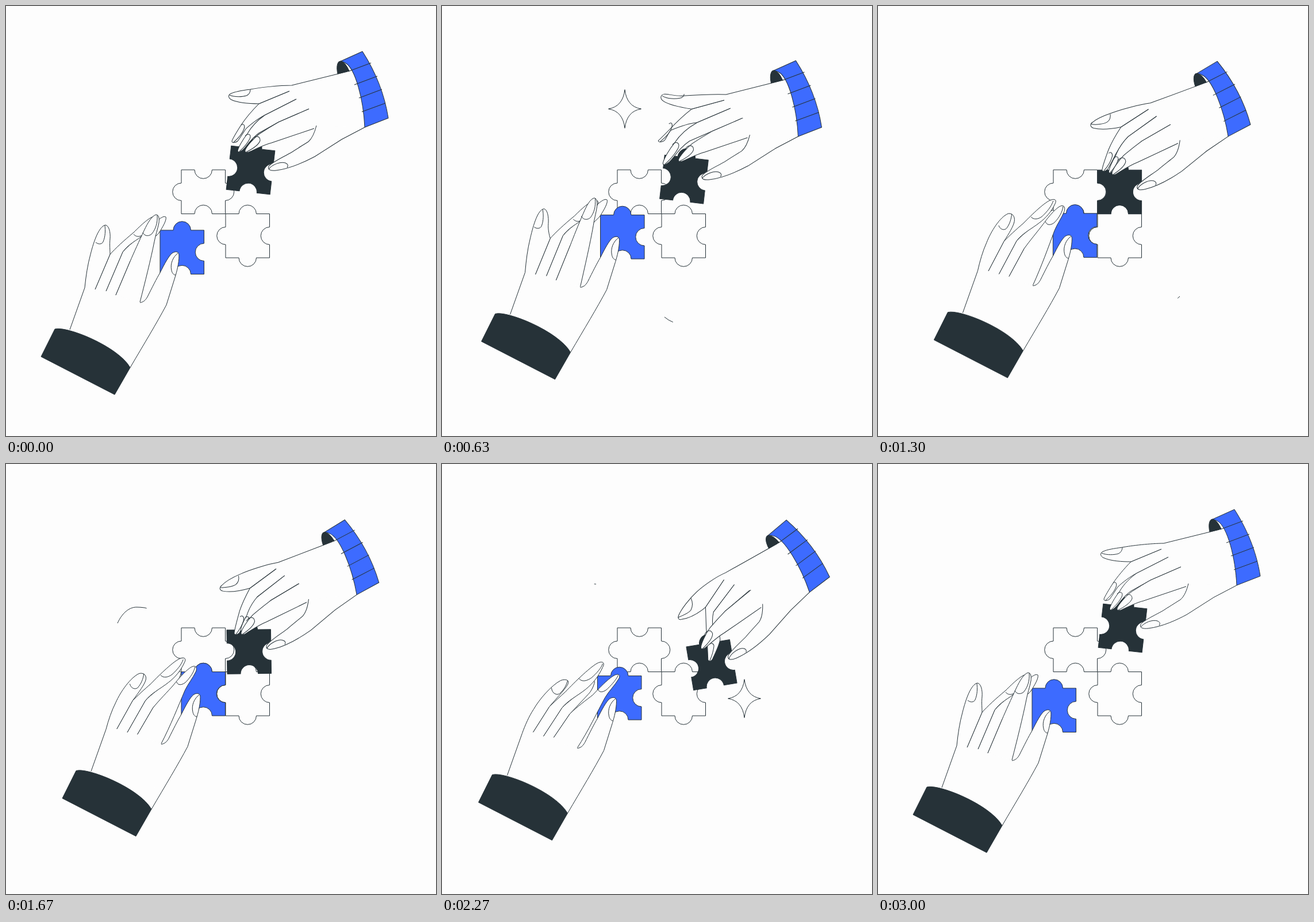
Write an HTML page that moves like this. It is 748x748 px and loops after 3.03 s.

```html
<!DOCTYPE html>
<html lang="en">
<head>
<meta charset="utf-8">
<title>Puzzle hands</title>
<style>
  html, body { margin: 0; width: 100%; height: 100%; overflow: hidden; background: #fdfdfd; }
  svg { display: block; width: 100vw; height: 100vh; }
  path { fill: none; stroke: #263238; stroke-width: 1; stroke-linejoin: round; }
  .skin { fill: #fdfdfd; }
  .palm { fill: #fdfdfd; stroke: none; }
  .blue { fill: #3d6bff; }
  .dark { fill: #263238; }
</style>
</head>
<body>
<svg id="stage" viewBox="0 0 748 748"></svg>
<script>
const LOOP = 3030;
const stage = document.getElementById('stage');

function add(parent, tag, attrs = {}) {
  const el = document.createElementNS('http://www.w3.org/2000/svg', tag);
  for (const k in attrs) el.setAttribute(k, attrs[k]);
  return parent.appendChild(el);
}
const draw = (parent, d, cls = '') => add(parent, 'path', { d, class: cls });

// Sides run clockwise from the top: 1 tab, -1 notch, 0 flat
function piece(x, y, sides) {
  let d = `M${x} ${y}`;
  [[1, 0], [0, 1], [-1, 0], [0, -1]].forEach(([u, v], i) => {
    const line = n => `l${u * n} ${v * n}`;
    const s = sides[i];
    d += s
      ? `${line(23)}a15.25 15.25 0 0 ${s > 0 ? 1 : 0} ${u * 30.5} ${v * 30.5}${line(23)}`
      : line(76.5);
  });
  return d + 'Z';
}

// A path that blends between two poses
const morphs = { left: [], right: [] };
function bend(side, parent, cls, a, b) {
  const to = b.match(/[\d.]+/g).map(Number);
  const el = draw(parent, a, cls);
  morphs[side].push(k => {
    let i = 0;
    el.setAttribute('d', a.replace(/[\d.]+/g, n => (+n + (to[i++] - n) * k).toFixed(2)));
  });
}

// Smooth curve through rows of [time, ...values], without overshoot
function track(rows) {
  const slope = (i, c) => {
    if (i === 0 || i === rows.length - 1) return 0;
    const d = j => (rows[j + 1][c] - rows[j][c]) / (rows[j + 1][0] - rows[j][0]);
    const p = d(i - 1), n = d(i);
    return p * n <= 0 ? 0 : 2 * p * n / (p + n);
  };
  return t => {
    let i = 0;
    while (i < rows.length - 2 && t >= rows[i + 1][0]) i++;
    const a = rows[i], b = rows[i + 1], h = b[0] - a[0];
    const u = Math.min(1, Math.max(0, (t - a[0]) / h));
    return a.slice(1).map((v, j) => {
      const c = j + 1, w = 1 - u;
      return v * (1 + 2 * u) * w * w + h * slope(i, c) * u * w * w
        + b[c] * u * u * (3 - 2 * u) - h * slope(i + 1, c) * u * u * w;
    });
  };
}

// Fixed pieces
draw(stage, piece(305, 285, [-1, 1, -1, 1]));
draw(stage, piece(382, 361.5, [1, -1, 1, 1]));

// Sparkles
const sparkle = 'M0-33.5Q3.5-4 28.5 0Q3.5 4 0 33.5Q-3.5 4-28.5 0Q-3.5-4 0-33.5Z';
const stars = [[318, 179, 650], [526, 408, 2240]].map(([x, y, peak]) => {
  const el = draw(stage, sparkle);
  el.setAttribute('vector-effect', 'non-scaling-stroke');
  return t => {
    const a = (t - peak) / 570;
    const k = Math.abs(a) < 1 ? Math.cos(a * Math.PI / 2) : 0;
    el.setAttribute('transform', `translate(${x} ${y}) scale(${k})`);
    el.style.display = k > 0.02 ? '' : 'none';
  };
});

// Curls: a stretch of line running along a path, rows are [time, tail, head]
const curls = [
  ['M387 541Q394 547 402 550C430 560 457 545 463 518C470 490 462 482 448 482' +
   'C432 482 428 497 432 507Q435 515 440 518C460 532 500 530 525 505',
   L => [[560, 0, 0], [630, 0, 17], [970, 92, 188], [1200, 220, L], [1330, L, L]]],
  ['M194 277C200 263 212 249 227 249Q234 249 241 250C258 253 262 280 246 280' +
   'C230 280 232 240 244 222Q253 207 268 209',
   L => [[1540, 0, 0], [1670, 0, 63], [2150, L - 45, L], [2270, L - 4, L], [2290, L, L]]]
].map(([d, rows]) => {
  const el = draw(stage, d);
  const at = track(rows(el.getTotalLength()));
  return t => {
    const [tail, head] = at(t);
    el.style.display = head - tail > 0.3 ? '' : 'none';
    el.setAttribute('stroke-dasharray', `0 ${tail} ${head - tail} 2000`);
  };
});

// Left hand
const left = add(stage, 'g');
draw(left, piece(268, 390, [1, -1, -1, 0]), 'blue');
draw(left, 'M111 563L137 490L155 493L174 496L191 503L233 516L279 520L216 629Z', 'palm');
bend('left', left, 'skin',
  'M174 496L203 428C215 413 240 398 255 382C265 371 274 364 278 367C280 372 272 386 265 396L216 444L191 503',
  'M174 495L206 446C215 436 235 422 250 409C256 402 262 397 263 400C262 408 256 418 252 422L220 456L192 497');
bend('left', left, 'skin',
  'M155 493L181 432C190 422 205 408 222 394C236 380 250 367 258 366C264 364 268 366 264 373C260 381 250 392 240 398C228 407 212 415 203 428L174 496',
  'M156 488L184 444C192 436 203 426 212 418C228 401 259 371 270 367C278 364 281 368 277 375C270 391 260 403 248 413C233 425 216 433 206 446L174 495');
bend('left', left, '',
  'M222 397C226 402 233 402 238 398C246 390 254 380 258 367',
  'M236 395C241 401 250 399 258 393C267 385 274 377 277 369');
bend('left', left, 'skin',
  'M111 563L137 490C139 470 142 450 147 432C153 408 162 383 173 381C179 382 182 393 181 405C180 415 181 425 181 432L155 493',
  'M111 563L137 490C142 476 149 460 157 448C166 432 187 407 204 398C212 395 219 397 217 403C215 410 200 425 184 444L156 488');
bend('left', left, '',
  'M156 411C160 415 167 415 169 410C173 401 173 390 172 382',
  'M188 411C189 421 197 424 202 421C209 415 214 407 216 398');
bend('left', left, 'skin',
  'M191 503L216 444C222 430 232 408 240 391C247 376 254 365 261 363C266 363 267 370 266 377C264 388 260 399 258 410C252 440 242 480 233 515',
  'M192 497L220 456C232 444 250 431 260 423C273 409 292 390 300 388C306 386 308 390 305 395C298 407 288 416 281 428C268 452 252 486 233 515');
bend('left', left, '',
  'M238 394C241 401 249 401 254 396C260 388 264 378 263 364',
  'M269 413C270 420 279 419 286 412C294 404 301 396 304 389');
draw(left, 'M233 516C240 515 243 511 246 506C254 490 262 474 268 464C276 448 283 435 289 430' +
  'C295 426 301 427 301 434C301 448 297 462 294 472L279 520C262 552 240 588 216 629', 'skin');
draw(left, 'M299 430C291 436 285 448 288 460C289 465 292 468 295 468');
draw(left, 'M85 562C105 556 195 592 216 629L189 676L61 610Z', 'dark');

// Right hand
const PIVOT = [425.5, 285.5];
const right = add(stage, 'g');
draw(right, piece(PIVOT[0] - 38.25, PIVOT[1] - 38.25, [1, -1, -1, -1]), 'dark')
  .setAttribute('transform', `rotate(6.5 ${PIVOT})`);
draw(right, 'M594 114L497 138L493 148L505 162L527 179L536 213L526 236L537 262L584 232L624 211C622 165 608 115 594 110Z', 'palm');
bend('right', right, 'skin',
  'M493 148L440 170C428 182 415 198 409 207C402 218 394 231 393 235C393 239 399 238 403 235C408 228 413 220 417 214C425 206 440 195 450 190L505 162',
  'M487 149L443 186C440 198 437 210 434 222C431 238 425 262 422 275C422 280 427 279 430 276C436 269 448 256 452 247C455 230 454 212 454 198L502 162');
bend('right', right, '',
  'M409 207C414 203 416 209 414 214C411 222 404 230 396 237',
  'M432 250C436 247 440 252 438 256C435 263 430 271 424 278');
bend('right', right, 'skin',
  'M505 162L450 190C440 197 428 208 420 222C412 232 404 246 403 252C404 257 412 251 416 246C424 236 430 228 440 221L474 202L527 179',
  'M502 162L454 198C450 205 447 215 446 222C442 228 438 234 437 238C438 241 441 238 443 236C446 232 449 229 452 226L474 202L525 179');
bend('right', right, '',
  'M416 226C422 220 427 224 424 231C420 239 413 247 406 253',
  'M442 228C444 226 446 227 445 230C444 233 442 236 439 238');
draw(right, 'M527 179L474 202C460 210 446 219 440 223C430 231 418 245 416 251C415 256 421 255 425 253C438 247 450 241 462 238L536 213', 'skin');
draw(right, 'M428 232C434 224 442 226 442 234C440 241 428 249 418 254');
bend('right', right, 'skin',
  'M594 114L497 138C475 138 440 142 425 145C410 147 398 149 392 152C386 154 386 160 392 163C405 169 425 170 440 170L493 148',
  'M594 114L493 138C476 140 450 149 436 156C420 164 401 178 394 187C391 191 392 195 397 195C413 197 430 192 443 186L487 149');
bend('right', right, '',
  'M389 155C398 159 412 158 418 156C423 154 425 149 425 145',
  'M392 190C402 189 412 188 417 184C422 179 424 172 423 164');
draw(right, 'M540 208C537 220 533 230 526 236C515 243 505 249 496 255C480 264 462 272 457 279' +
  'C455 285 460 287 470 286C495 283 520 271 537 262L584 232L624 211', 'skin');
draw(right, 'M457 284C462 276 478 270 486 273C491 275 491 278 489 281');
draw(right, 'M577 118C574 104 577 96 582 96C588 97 593 104 597 113Z', 'dark');
draw(right, 'M580 97L620 79C640 110 658 150 665 195L624 211C622 165 608 108 590 99Q584 95 580 97Z', 'blue');
draw(right, 'M595 114L635 99M606 137L646 122M614 160L654 145M619 184L660 169');

// [time, x, y, finger bend]
const leftAt = track([
  [0, 0, 0, 0], [250, -0.3, -4, -0.04], [530, 1.5, -19, -0.1], [630, 7.5, -26.5, -0.1],
  [970, 25.5, -31, 0.3], [1250, 36, -29.5, 0.52], [1450, 37, -28.5, 0.62], [1670, 37, -28.5, 0.7],
  [1900, 28, -29, 0.88], [2130, 11.5, -27, 0.98], [2270, 2.5, -21.5, 1], [2450, -1, -12, 0.9],
  [2730, -0.5, -2.5, 0.6], [2870, -0.2, -1, 0.25], [3000, 0, 0, 0], [LOOP, 0, 0, 0]
]);

// [time, x, y, turn, finger bend]
const rightAt = track([
  [0, ...PIVOT, 0, 0], [280, 427, 282.5, 0.3, -0.2], [530, 425, 293, 0.2, -0.4],
  [630, 421, 301.5, 0, -0.42], [970, 419.5, 320.5, -4.3, 0], [1250, 420.3, 323.3, -6.4, 0.2],
  [1500, 420.5, 323.6, -6.8, 0.3], [1670, 422.7, 326.5, -7.3, 0.38], [2130, 457, 346, -15, 0.9],
  [2270, 469, 349.5, -16, 1], [2450, 471.5, 345, -15, 1], [2730, 457, 326, -11.8, 0.92],
  [2870, 440, 304, -5.5, 0.45], [3000, ...PIVOT, 0, 0], [LOOP, ...PIVOT, 0, 0]
]);

function render(t) {
  const [lx, ly, lb] = leftAt(t);
  left.setAttribute('transform', `translate(${lx} ${ly})`);
  morphs.left.forEach(f => f(lb));

  const [rx, ry, turn, rb] = rightAt(t);
  right.setAttribute('transform',
    `translate(${rx} ${ry}) rotate(${turn}) translate(${-PIVOT[0]} ${-PIVOT[1]})`);
  morphs.right.forEach(f => f(rb));

  stars.forEach(f => f(t));
  curls.forEach(f => f(t));
}

const start = performance.now();
function tick() {
  render((performance.now() - start) % LOOP);
  requestAnimationFrame(tick);
}
render(0);
requestAnimationFrame(tick);
</script>
</body>
</html>
```
